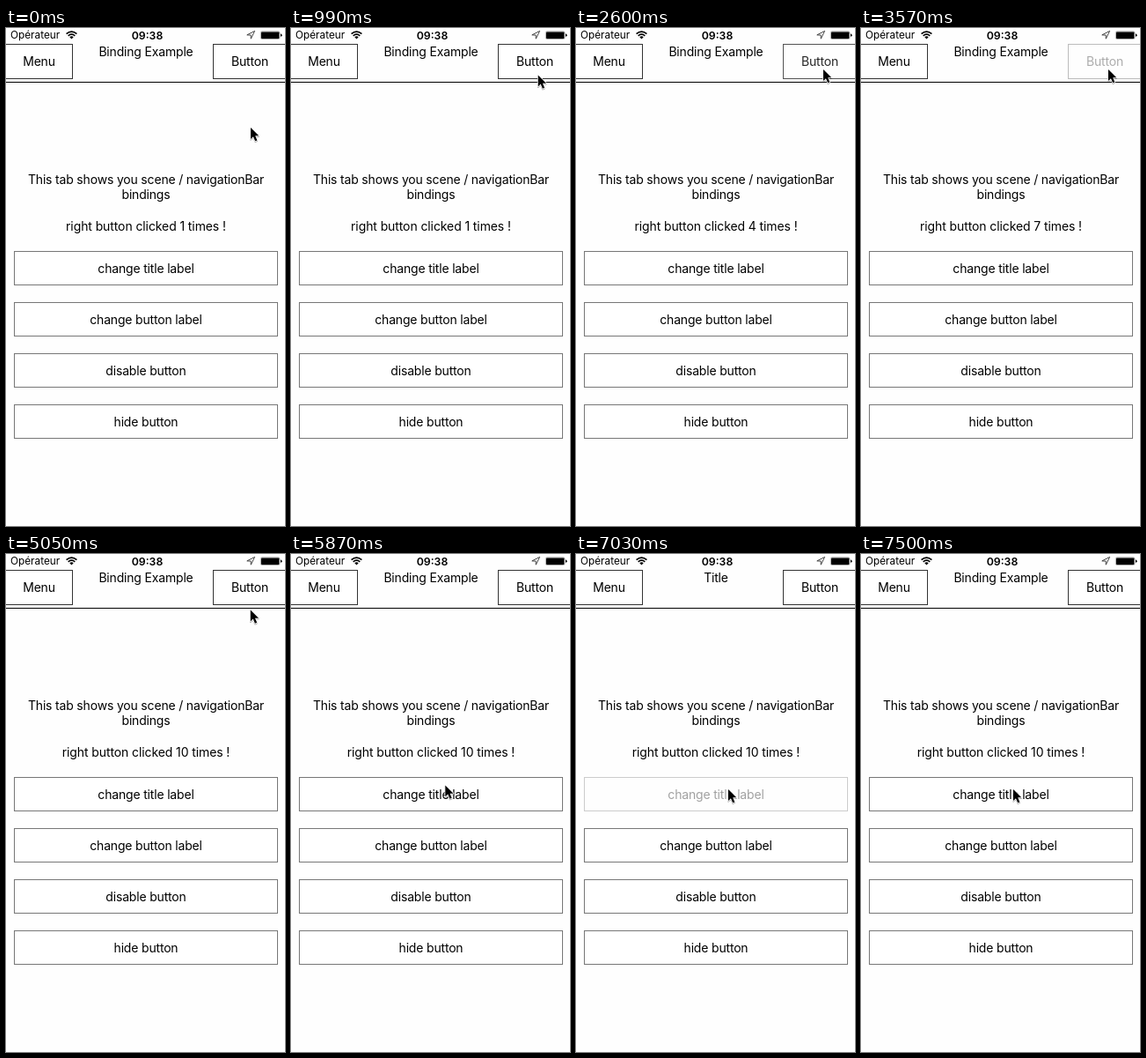
Recreate the animation shown at these times as an HTML page. Size 317x565 px, loop 8000 ms.

```html
<!DOCTYPE html>
<html lang="en">
<head>
<meta charset="utf-8">
<title>Binding Example</title>
<style>
  html, body { margin: 0; width: 100%; height: 100%; overflow: hidden; background: #fefefe; }
  svg { display: block; width: 317px; height: 565px; }
  text { font: 14px Inter, "Liberation Sans", sans-serif; letter-spacing: -.18px; text-anchor: middle; }
  .status text { font-size: 11.8px; letter-spacing: 0; text-anchor: start; }
  .status .clock { font-size: 12.3px; font-weight: 600; text-anchor: middle; }
  #count { letter-spacing: -.1px; }
  .box { fill: #fff; stroke: #777; }
  .nav .box { stroke: #333; }
</style>
</head>
<body>
<svg viewBox="0 0 317 565">
  <rect width="317" height="565" fill="#fefefe"/>

  <g class="status">
    <text x="5" y="12.3">Opérateur</text>
    <path d="M68.6 6.6Q74.5 1.6 80.4 6.6M70.7 8.8Q74.5 5.6 78.3 8.8" fill="none" stroke="#000" stroke-width="1.7"/>
    <path d="M72.3 10.2Q74.5 8.5 76.7 10.2L74.5 12.4Z"/>
    <text class="clock" x="160.5" y="12.5">09:38</text>
    <path d="M273.8 7.9L282.6 3.4 278.3 12.2 278.1 8.1Z" fill="none" stroke="#333" stroke-width=".9"/>
    <rect x="289.4" y="3.9" width="21.6" height="8.6" rx="1.6" fill="none" stroke="#888" stroke-width=".7"/>
    <rect x="290" y="4.4" width="20.4" height="7.6" rx=".8"/>
    <path d="M312 6.6q1.6 .3 1.6 1.6t-1.6 1.6z"/>
  </g>

  <g class="nav">
    <rect class="box" x="-5.5" y="18.5" width="81" height="39"/>
    <text x="37.5" y="43.2">Menu</text>
    <text id="title" x="159" y="31.7">Binding Example</text>
    <g id="button">
      <rect class="box" x="235.5" y="18.5" width="90" height="39"/>
      <text x="277" y="43.2">Button</text>
    </g>
    <path d="M0 61.5H317" stroke="#000"/>
  </g>

  <text x="159" y="176.7">This tab shows you scene / navigationBar</text>
  <text x="159" y="193.7">bindings</text>
  <text id="count" x="159" y="230.2"></text>

  <g id="list"></g>

  <g id="cursor">
    <g transform="scale(.9)">
      <path id="arrow" d="M0 0V14.4L3.3 11.3 5.7 17 8.2 16 5.8 10.4H10.3Z"
        stroke="#fff" stroke-width="1.6" paint-order="stroke" stroke-linejoin="round"/>
    </g>
  </g>
</svg>

<style>
  #cursor { filter: drop-shadow(.5px 1px .7px rgba(0, 0, 0, .3)); }
</style>

<script>
  const LOOP = 8000, HOLD = 120, FADE_IN = 130, FADE_OUT = 180, DIM = .2;
  const $ = id => document.getElementById(id);

  // Evenly spaced presses, in ms.
  const burst = (start, count, period) => Array.from({ length: count }, (_, i) => start + i * period);
  const buttonTaps = [...burst(1310, 3, 440), ...burst(2575, 6, 295)];
  const titleTaps = [...burst(6040, 1, 0), ...burst(6565, 3, 310)];

  const home = { x: 278, y: 113 };
  const moves = [
    { from: 690, to: 1110, x: 281, y: 47 },
    { from: 5040, to: 5050, x: 278, y: 63 },
    { from: 5050, to: 5750, x: 176, y: 261 },
    { from: 5750, to: 6570, x: 173, y: 267 }
  ];

  const labels = ['change title label', 'change button label', 'disable button', 'hide button'];
  $('list').innerHTML = labels.map((label, i) => `<g transform="translate(0 ${i * 58})">
    <rect class="box" x="9.5" y="253.5" width="299" height="38"/>
    <text x="159" y="277.5">${label}</text></g>`).join('');
  const titleButton = $('list').firstElementChild;

  const clamp = v => Math.min(1, Math.max(0, v));
  const released = (taps, t) => taps.filter(press => press + HOLD <= t).length;

  function opacity(taps, t) {
    return Math.min(...taps.map(press => {
      const down = clamp((t - press) / FADE_IN);
      const up = clamp((t - press - HOLD) / FADE_OUT);
      return 1 - (1 - DIM) * down * (1 - up);
    }));
  }

  function cursorAt(t) {
    return moves.reduce((p, m) => {
      const k = Math.sin(clamp((t - m.from) / (m.to - m.from)) * Math.PI / 2);
      return { x: p.x + (m.x - p.x) * k, y: p.y + (m.y - p.y) * k };
    }, home);
  }

  const setText = (el, text) => { if (el.textContent !== text) el.textContent = text; };

  function draw() {
    const t = performance.now() % LOOP;
    const { x, y } = cursorAt(t);
    setText($('count'), `right button clicked ${1 + released(buttonTaps, t)} times !`);
    setText($('title'), released(titleTaps, t) % 2 ? 'Title' : 'Binding Example');
    $('button').setAttribute('opacity', opacity(buttonTaps, t));
    titleButton.setAttribute('opacity', opacity(titleTaps, t));
    $('cursor').setAttribute('transform', `translate(${x} ${y})`);
    requestAnimationFrame(draw);
  }
  draw();
</script>
</body>
</html>
```
